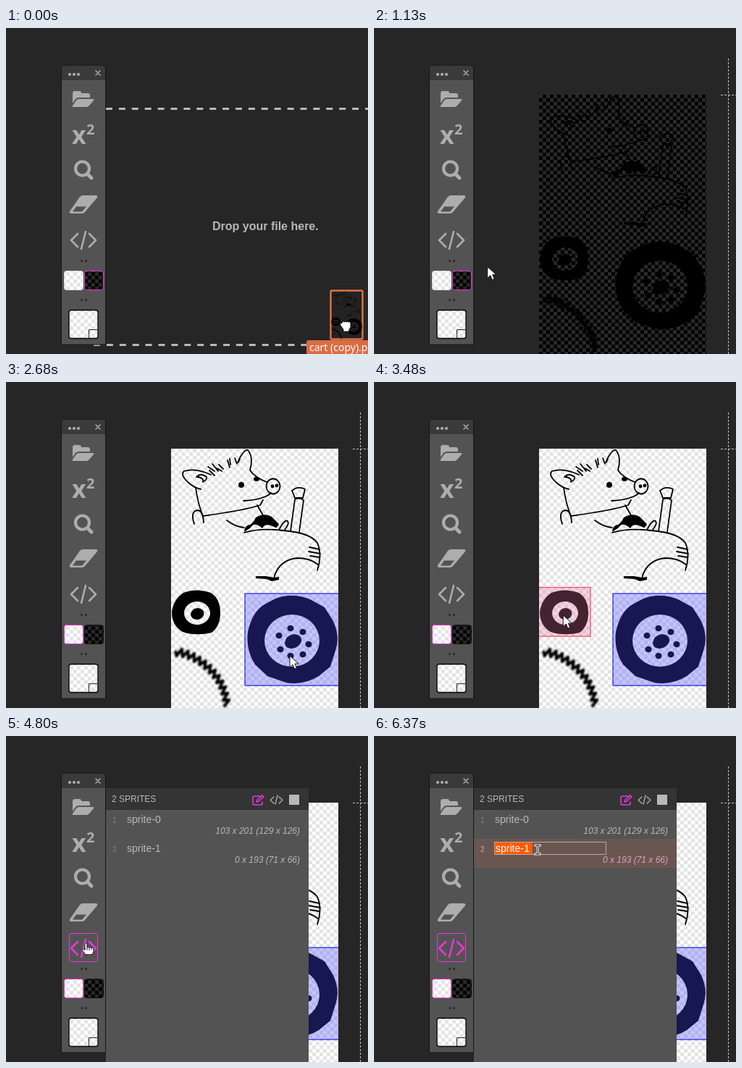
Recreate the animation shown at these times as an HTML page. Size 500 by 450 pixels, loop 8 s.

```html
<!DOCTYPE html>
<html lang="en">
<head>
<meta charset="utf-8">
<title>Sprite tool demo</title>
<style>
html, body { margin: 0; width: 100%; height: 100%; overflow: hidden; background: #262626; }
svg { display: block; }
text { font-family: "Liberation Sans", Arial, sans-serif; fill: #b8b8b8; }
.icon { fill: #adadad; }
.line { fill: none; stroke: #adadad; stroke-width: 2.6; stroke-linejoin: round; stroke-linecap: round; }
.ink { fill: none; stroke: #000; stroke-width: 1.8; stroke-linecap: round; stroke-linejoin: round; }
.small { font-size: 12px; }
.dims { font-size: 12px; font-style: italic; text-anchor: end; }
.name { font-size: 14px; }
.index { font-size: 10px; fill: #858585; }
.cursor { fill: #fff; stroke: #111; stroke-width: 1; stroke-linejoin: round; }
.pink { stroke: #e936d8; }
.hot text { fill: #d6a3c6; }
.hot #rowBack { fill: #6a5650; }
</style>
</head>
<body>
<svg width="500" height="450" viewBox="0 0 500 450">
<defs>
  <pattern id="light" width="10" height="10" patternUnits="userSpaceOnUse" x="228" y="92">
    <path fill="#fff" d="M0 0h10v10H0z"/><path fill="#e4e4e4" d="M0 0h5v5H0zM5 5h5v5H5z"/>
  </pattern>
  <pattern id="dark" width="10" height="10" patternUnits="userSpaceOnUse" x="228" y="92">
    <path d="M0 0h10v10H0z"/><path fill="#292929" d="M0 0h5v5H0zM5 5h5v5H5z"/>
  </pattern>
  <filter id="soft"><feGaussianBlur stdDeviation="1.3"/></filter>
  <clipPath id="sheet"><path d="M228 92h231v358H228z"/></clipPath>
  <g id="drawing" clip-path="url(#sheet)">
    <!-- head -->
    <g class="ink" stroke-width="1.6">
      <path d="M283 128Q262 118 246 123Q240 128 252 139Q260 146 269 148M263 131q6-6 14 0q1 4-5 7q2-6-9-7"/>
      <path d="M320 111Q328 93 334 94Q342 103 337 122Q344 132 360 138M262 146Q265 168 272 185Q330 177 351 170L355 163M328 164Q345 163 353 160Q363 157 366 153M347 170l8 14"/>
      <path d="M279 117l9 6M281 122l7 7M285 113l8 10M291 119l7 4M294 114l6 6M306 108l3 10M309 106l1 8M316 105l3 8M321 111l2-5"/>
      <path d="M260 196Q254 178 265 177Q272 178 273 194M305 191Q317 200 329 201"/>
      <ellipse cx="369" cy="144" rx="9.5" ry="10.5"/>
    </g>
    <circle cx="325" cy="142" r="4"/><ellipse cx="346" cy="134" rx="4" ry="3"/>
    <circle cx="368" cy="144" r="2.4"/><circle cx="374" cy="143" r="2.4"/>
    <!-- tractor -->
    <path d="M329 207q1-10 8-10q5-3 8-10q12-7 22-1l10 10q-2 5-5 5q-14-8-18 1q-11-10-16-1z"/>
    <g class="ink">
      <path d="M329 208Q350 201 383 205Q420 208 430 222Q437 238 430 260M370 271Q376 246 402 243Q420 243 431 252"/>
      <path d="M377 204q8-15 12-12q3 4-5 13M393 206L399 162Q405 159 411 163L405 207M399 160L395 150Q403 143 413 148L410 160Z"/>
      <path d="M419 228l14 3M418 234l16 3M420 240l13 2"/>
    </g>
    <path d="M345 268h14l11 2 7-1v4l-10 2-7-3-15-1z"/>
    <path fill-rule="evenodd" d="M245 291Q263 284 283 291Q296 299 296 319Q296 337 284 346Q262 351 244 345Q229 336 229 318Q231 300 245 291ZM246 319a18 16 0 1 0 36 0a18 16 0 1 0-36 0Z"/>
    <path d="M255 321q1-9 11-9q9 2 7 10q-3 6-10 6q-7-1-8-7z"/>
    <path fill-rule="evenodd" d="M372 299Q395 290 420 300L440 311 452 330Q462 352 455 371L448 393 432 406Q411 419 387 415L361 406 344 390Q331 370 334 345Q340 317 357 307ZM357 357a38 36 0 1 0 76 0a38 36 0 1 0-76 0Z"/>
    <path d="M385 360q2-11 13-12q11 1 10 10q-3 9-14 10q-9-1-9-8z"/>
    <g id="bolts"></g>
    <path id="fur" filter="url(#soft)" fill="none" stroke="#000" stroke-width="4" stroke-linejoin="round"/>
  </g>
</defs>

<rect width="500" height="450" fill="#262626"/>
<g id="dropZone">
  <path d="M138 111.5H500M121 437.5H500" stroke="#b9b9b9" stroke-width="3" stroke-dasharray="9 8.9" stroke-dashoffset="0"/>
  <text x="285" y="279" font-size="16" font-weight="bold">Drop your file here.</text>
</g>

<g id="sheetView">
  <rect id="paper" x="228" y="92" width="231" height="358"/>
  <use href="#drawing"/>
  <path d="M489.500 42V450M479 92.500H500" stroke="#c4c4c4" stroke-dasharray="3 2"/>
  <g clip-path="url(#sheet)">
    <rect id="pickBig" x="330" y="292" width="140" height="127" fill="#4a4aff" fill-opacity=".32" stroke="#3a3af0" stroke-width="1.4"/>
    <rect id="pickSmall" x="220" y="283.500" width="79" height="67.500" fill="#e0709c" fill-opacity=".3" stroke="#f0506c" stroke-width="1.3"/>
  </g>
</g>

<!-- toolbar -->
<path d="M76.500 437V57q0-5 5-5h51q5 0 5 5v380z" fill="#535353" stroke="#151515"/>
<path d="M77 72V57q0-5 5-5h50q5 0 5 5v15z" fill="#3a3a3a"/>
<g class="icon">
  <circle cx="88" cy="64" r="2.1"/><circle cx="94" cy="64" r="2.1"/><circle cx="100" cy="64" r="2.1"/>
  <path d="M92 104V90q0-3 3-3h6q3 0 3 3h9q3 0 3 3v3h-15q-3 0-5 2z"/>
  <path d="M101 98h19q2 0 1 2l-6 7q-2 2-4 2H93q-2 0-1-2l5-7q1-2 4-2z"/>
  <path fill-rule="evenodd" d="M106 231H124q3 0 2 3L109 254q-2 2-4 2H90q-3 0-2-3L102 233q2-2 4-2ZM92 253.500h13l6-7H97z"/>
</g>
<path class="line" stroke-width="1.5" d="M124 59l6 6m0-6l-6 6" style="stroke-width:1.5"/>
<g font-weight="bold">
  <text class="icon" x="91" y="160" font-size="34" style="font-family:'Open Sans',sans-serif;fill:#adadad">x</text>
  <text class="icon" x="111" y="147" font-size="20" style="font-family:'Open Sans',sans-serif;fill:#adadad">2</text>
</g>
<circle class="line" cx="105.500" cy="194" r="9.500" style="stroke-width:4.2"/>
<path class="line" d="M113 202l5 5" style="stroke-width:5"/>
<rect id="codeBox" class="line" x="87.500" y="272.500" width="39" height="39" rx="3" style="stroke-width:1"/>
<path id="codeIcon" class="line" d="M99 284l-9 9 9 9M115 284l9 9-9 9M110 281l-6 24"/>
<path d="M103 320h3v3h-3zm6 0h3v3h-3zM103 374h3v3h-3zm6 0h3v3h-3z" fill="#303030"/>
<rect id="lightSwatch" x="80.500" y="335.500" width="26" height="26" rx="3" fill="url(#light)"/>
<rect id="darkSwatch" x="108.500" y="335.500" width="26" height="26" rx="3" fill="url(#dark)"/>
<rect x="87" y="389.500" width="40" height="39" rx="3" fill="url(#light)" stroke="#000" stroke-width="1.3"/>
<path d="M114.500 428V416.500H126" fill="none" stroke="#222"/>

<g id="panel">
  <path d="M138 72h280v378H138z" fill="#535353"/>
  <path d="M138 72h280v30H138z" fill="#343434"/>
  <text class="small" x="146" y="91">2 SPRITES</text>
  <path class="line pink" d="M352 83h-9q-2 0-2 2v8q0 2 2 2h9q2 0 2-2v-2M346 91l1-3 7-6 2 2-7 6z" style="stroke-width:1.6;stroke:#e936d8"/>
  <path class="line" d="M370 84l-5 4.500 5 4.500M377 84l5 4.500-5 4.500M375 82l-3 12" style="stroke-width:1.4"/>
  <rect x="391" y="81" width="14" height="14" fill="#b8b8b8"/>
  <text class="index" x="147" y="120">1</text>
  <text class="name" x="167" y="120">sprite-0</text>
  <text class="dims" x="406" y="135">103 x 201 (129 x 126)</text>
  <g id="row">
    <rect id="rowBack" x="138" y="142" width="280" height="40" fill="#535353"/>
    <text class="index" x="147" y="160">2</text>
    <text class="name" x="167" y="160">sprite-1</text>
    <text class="dims" x="406" y="175">0 x 193 (71 x 66)</text>
  </g>
  <g id="editor">
    <rect x="166.500" y="146.500" width="154" height="17" fill="#6a5650" stroke="#b4aaa6"/>
    <path d="M167 147h52v16h-52z" fill="#ff5a00"/>
    <text class="name" x="168" y="160" style="fill:#fff">sprite-1</text>
  </g>
</g>

<g id="drag">
  <rect x="448.500" y="362.500" width="44" height="67" rx="1.500" fill="#222" stroke="#e07347" stroke-width="2.4"/>
  <use href="#drawing" transform="translate(449 363) scale(.187) translate(-228 -92)"/>
  <rect x="415" y="431" width="110" height="20" rx="3" fill="#dc6d42"/>
  <text x="419" y="446" font-size="14" style="font-family:'Noto Sans',sans-serif;fill:#fff">cart (copy).png</text>
  <path class="cursor" d="M463 412l-2-4 2-1 1 1v-2q2-2 3 0q2-2 3 0q2-2 3 0q2-1 3 1v6l-2 3v3h-8v-3z"/>
</g>
<path id="arrow" class="cursor" d="M0 0V16l4-4 2.500 6 3-1-2.500-6H12z"/>
<g id="hand" class="cursor">
  <path d="M-1 1q1.500-2 3 0v5q2-1 3 .5q2-1 3 .5q2-1 3 1v4l-2 4H0l-5-6q0-2 2-2l2 2z"/>
  <path d="M2 6v4M5 7v3M8 8v2" fill="none"/>
</g>
<g id="beam" fill="none" stroke-linecap="square">
  <path d="M-3-6h6M0-6V6M-3 6h6" stroke="#fff" stroke-width="3"/><path d="M-3-6h6M0-6V6M-3 6h6" stroke="#111"/>
</g>
</svg>
<script>
const LOOP = 8000;
const $ = id => document.getElementById(id);
const show = (id, on) => { $(id).style.display = on ? "" : "none"; };

$("bolts").innerHTML = [[393, 340], [410, 345], [377, 350], [379, 369], [418, 362], [410, 376], [393, 378]]
  .map(([x, y]) => `<ellipse cx="${x}" cy="${y}" rx="4.6" ry="4.2"/>`).join("");

// Fur: short zigzag hairs along a falling arc.
let fur = "M234 371";
for (let i = 0; i <= 24; i++) {
  const u = i / 24, side = i % 2 ? 5 : -5;
  const x = 237 + 68 * Math.sin(u * 1.5), y = 373 + 73 * u ** 1.55;
  fur += `L${(x + side * (0.3 + u * 0.5)).toFixed(1)} ${(y - side * (1 - u * 0.5)).toFixed(1)}`;
}
$("fur").setAttribute("d", fur);

// Pointer stops: time, x, y
const stops = [
  [680, 331, 284], [1370, 90, 347], [1720, 90, 347], [2320, 385, 366], [2680, 392, 378],
  [3080, 288, 332], [3260, 264, 322], [3440, 264, 322], [3920, 130, 317], [4280, 109, 287],
  [4760, 109, 287], [5480, 215, 152], [5910, 215, 152], [6370, 226, 157]
];
const smooth = u => u * u * (3 - 2 * u);
const progress = (t, a, b) => smooth(Math.min(1, Math.max(0, (t - a) / (b - a))));

function pointer(t) {
  let [, x, y] = stops[0];
  for (let i = 1; i < stops.length; i++) {
    const [a, x0, y0] = stops[i - 1], [b, x1, y1] = stops[i];
    if (t < a) break;
    const u = progress(t, a, b);
    x = x0 + (x1 - x0) * u;
    y = y0 + (y1 - y0) * u;
  }
  return [x, y];
}

function draw(t) {
  const [x, y] = pointer(t);
  const dragging = t < 640, loaded = t >= 800, light = t >= 1460;
  const open = t >= 4760, editing = t >= 5910;
  const inside = (l, top, r, b) => x >= l && x <= r && y >= top && y <= b;
  const overCode = inside(87, 272, 127, 312);
  const hand = overCode || inside(80, 335, 135, 362);

  show("dropZone", !loaded);
  show("sheetView", loaded);
  $("paper").setAttribute("fill", light ? "url(#light)" : "url(#dark)");
  $("lightSwatch").setAttribute("stroke", light ? "#e936d8" : "#ddd");
  $("darkSwatch").setAttribute("stroke", light ? "#111" : "#e936d8");
  show("pickBig", t >= 2440);
  show("pickSmall", t >= 3360);

  show("codeBox", open || overCode);
  for (const id of ["codeBox", "codeIcon"]) $(id).style.stroke = open ? "#e936d8" : "#adadad";
  show("panel", open);
  show("editor", editing);
  const paused = t >= 5710 && !editing;
  $("row").setAttribute("class", inside(138, 142, 418, 182) && !paused ? "hot" : "");

  show("drag", dragging);
  const d = progress(t, 0, 380);
  $("drag").setAttribute("transform", `translate(${-147 * d} ${-136 * d})`);
  const kind = dragging ? "" : editing ? "beam" : hand ? "hand" : "arrow";
  for (const id of ["arrow", "hand", "beam"]) {
    show(id, id === kind);
    $(id).setAttribute("transform", `translate(${x} ${y})`);
  }
}

const start = performance.now();
function tick() {
  draw((performance.now() - start) % LOOP);
  requestAnimationFrame(tick);
}
tick();
</script>
</body>
</html>
```
